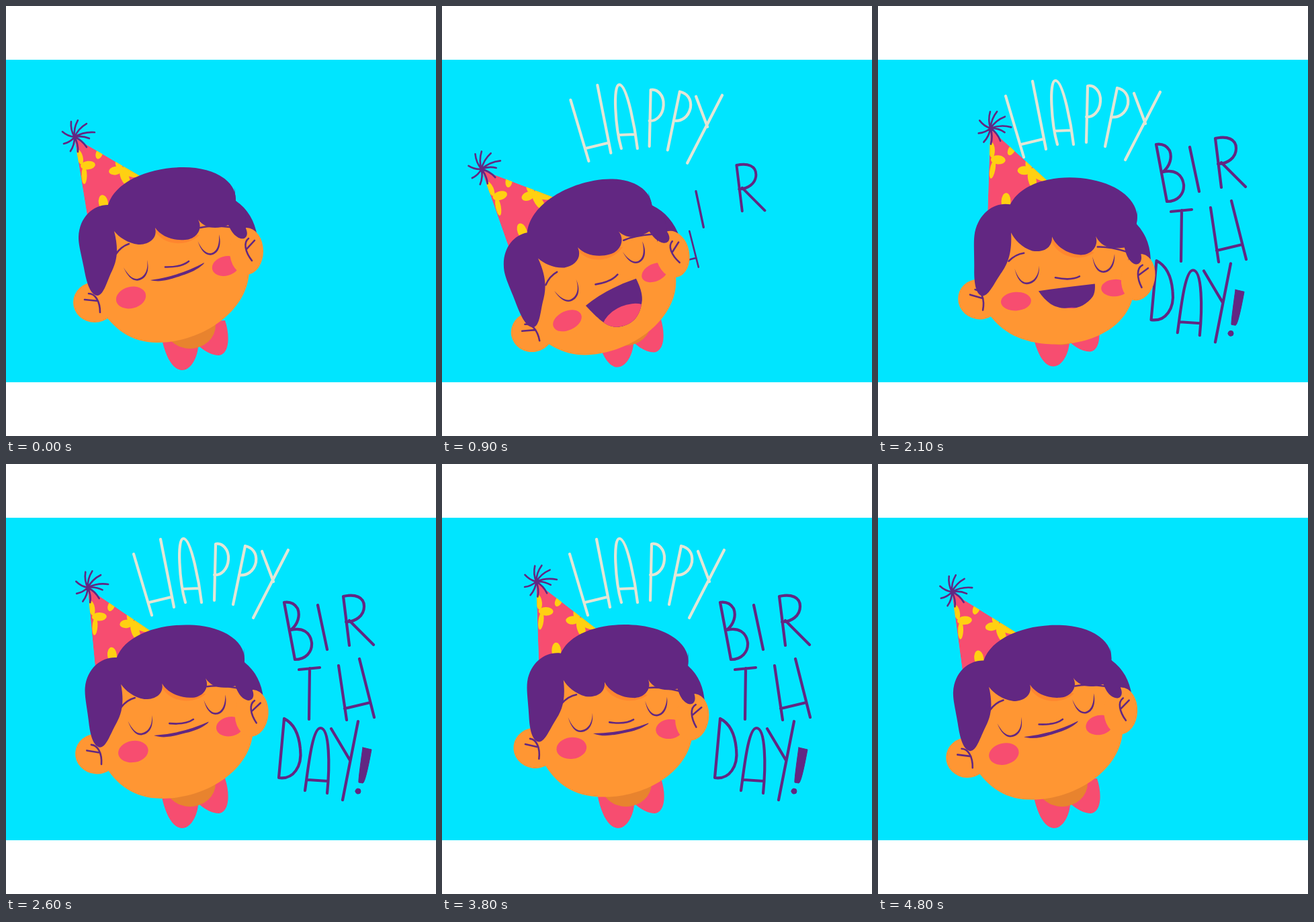
An HTML page that plays this animation: 640 by 640 pixels, repeating every 4900 ms.

```html
<!DOCTYPE html>
<html lang="en">
<head>
<meta charset="utf-8">
<title>Happy birthday</title>
<style>
  html, body { margin: 0; width: 100%; height: 100%; overflow: hidden; background: #fff; }
  svg { display: block; width: 100vw; height: 100vh; }
  .line { fill: none; stroke: #622782; stroke-width: 2.6; stroke-linecap: round; stroke-linejoin: round; }
  .purple { fill: #622782; }
  .skin { fill: #ff9633; }
  .pink { fill: #f74d70; }
  .yellow { fill: #ffd012; }
  #letters path { fill: none; stroke: #622782; stroke-width: 4.2; stroke-linecap: round; stroke-linejoin: round; }
  #letters path.pale { stroke: #e2e6d6; }
  #letters path.solid { fill: #622782; stroke-width: 1; }
</style>
</head>
<body>
<svg viewBox="0 0 640 640">
  <defs>
    <clipPath id="hatClip"><path d="M102 196L122 318L220 265Z"/></clipPath>
    <clipPath id="mouthClip"><path id="mouthHole"/></clipPath>
  </defs>
  <rect width="640" height="640" fill="#fff"/>
  <rect y="80" width="640" height="480" fill="#00e5ff"/>
  <g id="letters"></g>

  <g id="collar">
    <path class="pink" d="M229 470C231 510 245 542 262 542C276 542 285 522 286 507L290 470Z"/>
    <path class="pink" d="M287 506C296 514 306 520 317 520C332 518 334 492 326 468L290 470Z"/>
    <ellipse cx="274" cy="475" rx="38" ry="35" fill="#e8832e"/>
  </g>

  <g id="head">
    <g class="crown">
      <g clip-path="url(#hatClip)">
        <path class="pink" d="M102 196L122 318L220 265Z"/>
        <g class="yellow">
          <ellipse cx="110" cy="225" rx="4.5" ry="11" transform="rotate(-14 110 225)"/>
          <ellipse cx="122" cy="237" rx="11" ry="6.3" transform="rotate(-6 122 237)"/>
          <ellipse cx="116.500" cy="252" rx="4" ry="13"/>
          <ellipse cx="139" cy="219" rx="5" ry="9" transform="rotate(20 139 219)"/>
          <ellipse cx="163" cy="245" rx="10" ry="6.200" transform="rotate(-10 163 245)"/>
          <ellipse cx="168" cy="235" rx="5" ry="10" transform="rotate(-12 168 235)"/>
          <ellipse cx="177" cy="255" rx="6" ry="14" transform="rotate(-24 177 255)"/>
          <ellipse cx="186" cy="247" rx="16" ry="7" transform="rotate(18 186 247)"/>
          <ellipse cx="145" cy="293" rx="7" ry="12" transform="rotate(-10 145 293)"/>
        </g>
      </g>
      <path id="pom" class="line"/>
    </g>
    <ellipse class="skin" cx="132" cy="441" rx="32" ry="30"/>
    <path id="face" class="skin"/>
    <path class="line" d="M123 428C133 428 140 440 140 456M117 437L137 439"/>
    <path class="line" id="browLeft" d="M163 370Q171 358 183 354"/>
    <path class="line" id="browRight" d="M289 330Q306 326 333 329"/>
    <path class="line" d="M237 388.500Q261 389 272 380"/>
    <g id="eyes" class="purple">
      <path d="M175 389C181 403 189 410 197 408.500C210 406 214 392 210 378C212 391 208 403 196 406C189 407 182 401 175 389Z"/>
      <path d="M285.500 350C290 364 297 372 306 370.500C318 368 321 353 317 340C318 353 315 366 305 368C298 369 291 362 285.500 350Z"/>
    </g>
    <ellipse id="cheekLeft" class="pink" cx="186" cy="434" rx="22.500" transform="rotate(-14 186 434)"/>
    <ellipse id="cheekRight" class="pink" cx="327" cy="387" rx="20.500" transform="rotate(-14 327 387)"/>
    <path id="mouth" class="purple"/>
    <g clip-path="url(#mouthClip)">
      <ellipse class="pink" cx="275" cy="457" rx="42" ry="30" transform="rotate(-12 275 457)"/>
    </g>
    <g class="crown">
      <path fill="#ff862f" d="M220 332C233 358 270 359 288 341Z"/>
      <path class="purple" d="M340 270L342 290C360 302 370 320 374 342L340 345Z"/>
    </g>
    <ellipse class="skin" cx="358" cy="365" rx="25" ry="35"/>
    <path class="line" d="M361 346C353 352 356 366 366 379M358 362L370 349"/>
    <path class="crown purple" d="M136 431C126 430 121 414 118 400C113 372 108 358 108 344C109 314 130 296 152 296C163 260 215 240 264 240C312 240 344 262 342 290L357 304L357 331C362 342 356 348 349 346C340 343 335 335 331 326C312 333 296 331 286 318C294 332 283 347 267 348C248 350 230 342 222 330C226 346 213 355 197 355C181 353 168 344 161 335C169 366 164 382 156 398C149 414 145 430 136 431Z"/>
  </g>
</svg>
<script>
const LOOP = 4900;
const PIVOT = [275, 481];
const SOURCE = [270, 380];
const $ = id => document.getElementById(id);
const mix = (a, b, k) => a + (b - a) * k;

// Keys are [ms, value].
const SWING = [[0, 0], [600, -8.8], [750, -11], [900, -10.4], [1200, -8.8], [1600, 3.75], [2000, 11],
  [2400, 6.5], [2600, 3.9], [3000, -9.8], [3120, -10.6], [3400, -6.64], [3600, 2.4], [4000, 11],
  [4200, 11.96], [4800, 1.62]];
const NOD = [[0, 0], [600, 0], [900, .5], [1200, .9], [1600, 1], [1900, .9], [2400, .06], [2500, 0], [LOOP, 0]];
const SING = [[0, 0], [300, 0], [550, .9], [900, 1], [1600, .73], [2000, .7], [2300, 0], [LOOP, 0]];

// Cubic curve through the keys, wrapping around the loop.
function spline(keys, t) {
  const n = keys.length;
  const key = i => {
    const turn = Math.floor(i / n), [time, value] = keys[i - turn * n];
    return [time + turn * LOOP, value];
  };
  let i = n - 1;
  while (keys[i][0] > t) i--;
  const [a, b, c, d] = [-1, 0, 1, 2].map(k => key(i + k));
  const span = c[0] - b[0], u = (t - b[0]) / span;
  const m0 = (c[1] - a[1]) / (c[0] - a[0]) * span;
  const m1 = (d[1] - b[1]) / (d[0] - b[0]) * span;
  return (2 * u ** 3 - 3 * u ** 2 + 1) * b[1] + (u ** 3 - 2 * u ** 2 + u) * m0 +
    (3 * u ** 2 - 2 * u ** 3) * c[1] + (u ** 3 - u ** 2) * m1;
}

function eased(keys, t) {
  const i = keys.findIndex(k => k[0] > t);
  const [a, b] = [keys[i - 1], keys[i]];
  const u = (t - a[0]) / (b[0] - a[0]);
  return mix(a[1], b[1], (1 - Math.cos(Math.PI * u)) / 2);
}

// [start ms, path, class]
const letters = [
  [520, 'M190 134L217 225M230 112L250 213M213 206L246 198', 'pale'],
  [510, 'M267 206C258 175 254 111 264 111C276 111 288 180 291 206M263 186L287 185', 'pale'],
  [505, 'M310 203L312 119C322 117 332 127 331 142C330 157 320 166 310 165', 'pale'],
  [495, 'M338 209L356 122C366 124 374 132 372 146C369 160 358 167 347 165', 'pale'],
  [485, 'M381 130L398 175M420 128L368 229', 'pale'],
  [875, 'M414 206L430 291C446 291 456 280 455 266C453 250 441 243 424 247C435 238 438 225 434 215C429 207 421 205 414 206', ''],
  [848, 'M464 210L478 276', ''],
  [830, 'M511 270L502 197C520 193 533 198 533 212C533 226 520 235 506 235M511 233L547 269', ''],
  [885, 'M436 306L467 303M452 304L451 380', ''],
  [865, 'M495 300L507 381M526 290L548 377M504 364L542 355', ''],
  [1537, 'M414 379L406 467C428 470 441 450 438 424C436 402 428 386 414 379Z', ''],
  [1517, 'M445 486C450 450 456 393 468 393C482 393 482 450 478 490M449 470L479 472', ''],
  [1501, 'M484 394L512 441M524 383L501 500', ''],
  [1496, 'M531 422L544 425Q535 474 531 475L525 474Q524 472 531 422ZM520 487A4 4 0 0 0 528 487A4 4 0 0 0 520 487Z', 'solid']
].map(([start, d, cls]) => {
  const el = document.createElementNS('http://www.w3.org/2000/svg', 'path');
  el.setAttribute('d', d);
  el.setAttribute('class', cls);
  $('letters').append(el);
  const box = el.getBBox();
  return { el, start, x: box.x + box.width / 2, y: box.y + box.height / 2 };
});

function travel(t, start) {
  const s = (t - start) / 1000;
  if (s <= 0 || t >= 4600) return 0;
  const leave = Math.max(0, (t - 4300) / 300);
  return (1 - Math.exp(-9 * s) * Math.cos(15 * s)) * (1 - leave ** 3);
}

function moveLetter({ el, start, x, y }, t) {
  const p = travel(t, start);
  const scale = p < 1 ? 1 - (1 - p) ** 2 : 1;
  el.style.display = p > .02 ? '' : 'none';
  el.setAttribute('transform',
    `translate(${mix(SOURCE[0], x, p)} ${mix(SOURCE[1], y, p)}) scale(${scale}) translate(${-x} ${-y})`);
}

const tips = [[107, 170], [97, 172], [120, 175], [132, 188], [124, 197], [120, 210],
  [107, 217], [96, 216], [86, 205], [84, 187]];
$('pom').setAttribute('d', tips.map(([x, y]) => {
  const dx = x - 102, dy = y - 195;
  return `M102 195Q${102 + dx / 2 + dy * .16} ${195 + dy / 2 - dx * .16} ${x} ${y}`;
}).join(''));

const closed = [215, 408, 258, 402, 295, 382, 295, 383, 294, 384, 293, 385, 285, 392, 275, 397, 262, 401, 245, 407, 230, 412, 215, 408];
const open = [217, 417, 250, 398, 298, 391, 302, 405, 303, 415, 301, 424, 295, 445, 283, 457, 262, 457, 245, 457, 235, 445, 217, 417];

function mouthPath(k) {
  const v = closed.map((a, i) => mix(a, open[i], k));
  return `M${v.slice(0, 2)}Q${v.slice(2, 6)}C${v.slice(6, 12)}C${v.slice(12, 18)}C${v.slice(18)}Z`;
}

function facePath(n) {
  const low = 501 - 20 * n, right = 362 - 10 * n;
  return `M140 450C160 ${480 - 12 * n} 185 ${low} 225 ${low}` +
    `C290 ${low} ${right} ${455 - 8 * n} ${right} 392L345 320Q300 270 200 280L140 310Z`;
}

function draw(t) {
  const angle = spline(SWING, t), nod = eased(NOD, t), sing = eased(SING, t);
  letters.forEach(letter => moveLetter(letter, t));
  const set = (id, name, value) => $(id).setAttribute(name, value);
  const shift = (id, x, y) => set(id, 'transform', `translate(${x} ${y})`);

  shift('collar', -2 * nod, -9 * nod);
  set('head', 'transform', `translate(${15 * nod} ${35 * nod}) rotate(${angle} ${PIVOT})`);
  const stretch = 1 + .08 * nod;
  document.querySelectorAll('.crown').forEach(el =>
    el.setAttribute('transform', `translate(${-2 * nod} ${340 * (1 - stretch)}) scale(1 ${stretch})`));
  set('face', 'd', facePath(nod));
  shift('browLeft', 2 * nod, 12 * nod);
  shift('browRight', 2 * nod, 3 * nod);
  shift('eyes', 0, -4 * nod);
  set('cheekLeft', 'ry', 16 - 3.5 * nod);
  set('cheekRight', 'ry', 14.5 - 3 * nod);
  const mouth = mouthPath(sing);
  set('mouth', 'd', mouth);
  set('mouthHole', 'd', mouth);
}

const begin = performance.now();
function tick() {
  draw((performance.now() - begin) % LOOP);
  requestAnimationFrame(tick);
}
tick();
</script>
</body>
</html>
```
